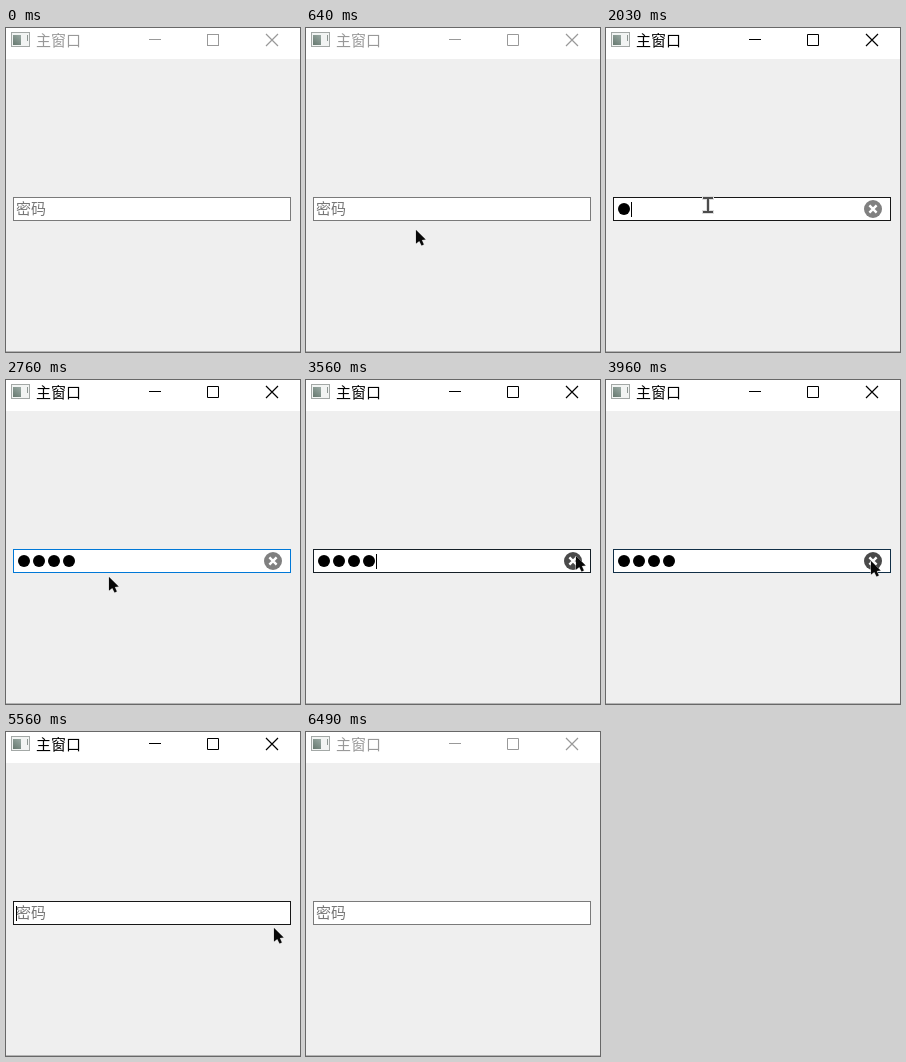
Animation, 294 px wide and 324 px high, one loop 6.63 s. Source, as an HTML page with a canvas:

```html
<!DOCTYPE html>
<html lang="zh">
<head>
<meta charset="utf-8">
<style>
html, body { margin: 0; width: 294px; height: 324px; overflow: hidden; background: #efefef; }
canvas { display: block; }
</style>
</head>
<body>
<canvas id="stage" width="294" height="324"></canvas>
<script>
const ctx = document.getElementById('stage').getContext('2d');
const LOOP = 6630, ACTIVATE = 840, DEACTIVATE = 6430;
const TYPE = 1965, KEY_GAP = 65, CLEAR = 4960;
const CLICK = 200, BLINK = 530, FADE = 180;
const ENTER = 120, LEAVE = 6030;
const GRAY = [122, 122, 122], DARK = [23, 23, 23], BLUE = [0, 120, 215];
const field = { x: 7, y: 169, w: 278, h: 24 };
const button = { x: 267, y: 181, r: 9 };

// The pointer rests between moves; bend bows the path vertically
const moves = [
  { from: ENTER, to: 770, x: 112, y: 187, bend: 0 },
  { from: 1569, to: 1570, x: 109, y: 158, bend: 0 },
  { from: 1570, to: 2030, x: 102, y: 177, bend: 0 },
  { from: 2030, to: 2760, x: 103, y: 196, bend: 0 },
  { from: 3090, to: 3560, x: 270, y: 175, bend: 20 },
  { from: 3560, to: 4030, x: 265, y: 183, bend: -12 },
  { from: 5490, to: 5560, x: 268, y: 195, bend: 0 },
  { from: 5560, to: LEAVE, x: 274, y: 324, bend: 0 }
];

const clamp = v => Math.max(0, Math.min(1, v));
const mix = (a, b, k) => a + (b - a) * k;
const smooth = k => k * k * (3 - 2 * k);
const within = (v, a, b) => v >= a && v < b;
const isActive = t => within(t, ACTIVATE, DEACTIVATE);

function pointerAt(t) {
  if (!within(t, ENTER, LEAVE)) return null;
  let x = 96, y = 320;
  for (const m of moves) {
    const k = smooth(clamp((t - m.from) / (m.to - m.from)));
    x = mix(x, m.x, k);
    y = mix(y, m.y, k) + m.bend * Math.sin(Math.PI * k);
  }
  return { x: Math.round(x), y: Math.round(y) };
}

function hovers(t) {
  const p = pointerAt(t);
  return p !== null && within(p.y, field.y, field.y + field.h + 3);
}

// Hover darkens gradually and ends at once
function borderAt(t) {
  const base = isActive(t) ? BLUE : GRAY;
  const samples = 12;
  let held = 0;
  while (held < samples && hovers(t - held * FADE / samples)) held++;
  return `rgb(${base.map((c, i) => Math.round(mix(c, DARK[i], held / samples)))})`;
}

function dotsAt(t) {
  if (!within(t, TYPE, CLEAR)) return 0;
  return Math.min(4, Math.max(1, Math.floor((t - TYPE) / KEY_GAP)));
}

function caretOn(t) {
  const reset = t < TYPE ? 1080 : 2170;
  return isActive(t) && Math.floor(Math.max(0, t - reset) / BLINK) % 2 === 0;
}

function rect(x, y, w, h, color) {
  ctx.fillStyle = color;
  ctx.fillRect(x, y, w, h);
}

function disc(x, y, r, color) {
  ctx.fillStyle = color;
  ctx.beginPath();
  ctx.arc(x, y, r, 0, Math.PI * 2);
  ctx.fill();
}

function cross(x, y, r, width, color) {
  ctx.strokeStyle = color;
  ctx.lineWidth = width;
  ctx.beginPath();
  ctx.moveTo(x - r, y - r);
  ctx.lineTo(x + r, y + r);
  ctx.moveTo(x + r, y - r);
  ctx.lineTo(x - r, y + r);
  ctx.stroke();
}

function label(text, x, y, color, weight) {
  ctx.font = weight + ' 15px "Noto Sans CJK SC", "Noto Sans CJK", sans-serif';
  ctx.fillStyle = color;
  ctx.fillText(text, x, y);
}

function drawWindowIcon() {
  const shade = ctx.createLinearGradient(7, 17, 15, 7);
  shade.addColorStop(0, '#66786f');
  shade.addColorStop(1, '#9aaaa4');
  rect(5, 4, 19, 15, '#a3a8a6');
  rect(6, 5, 17, 13, '#f2f4f3');
  rect(7, 7, 8, 10, shade);
  rect(21, 7, 1, 6, '#8d9692');
}

function drawWindow(active) {
  const ink = active ? '#000' : '#999';
  rect(0, 0, 294, 324, '#efefef');
  rect(0, 0, 294, 31, '#fff');
  rect(0, 323, 294, 1, '#b4b4b4');
  drawWindowIcon();
  label('主窗口', 30, 18, ink, 400);
  rect(143, 11, 12, 1, ink);
  ctx.strokeStyle = ink;
  ctx.lineWidth = 1;
  ctx.strokeRect(201.5, 6.5, 11, 11);
  cross(266, 12, 6, 1.2, ink);
}

function drawClearButton(t, pointer) {
  const shown = clamp((t - TYPE) / 60) * (1 - clamp((t - CLEAR) / 160));
  const hover = pointer && pointer.x >= button.x - button.r && hovers(t);
  ctx.globalAlpha = shown;
  disc(button.x, button.y, button.r, hover ? '#4a4a4a' : '#808080');
  cross(button.x, button.y, 3.6, 2.4, '#fff');
  ctx.globalAlpha = 1;
}

function drawField(t, pointer) {
  const { x, y, w, h } = field;
  const count = dotsAt(t);
  rect(x, y, w, h, borderAt(t));
  rect(x + 1, y + 1, w - 2, h - 2, '#fff');
  if (!count) label('密码', 10, 186, '#777', 300);
  for (let i = 0; i < count; i++) disc(18 + 15 * i, 181, 6, '#000');
  if (caretOn(t)) rect(10 + 15 * count, 174, 1, 15, '#000');
  drawClearButton(t, pointer);
}

function drawArrow(x, y) {
  const shape = [[0, 1], [0, 14.5], [3.3, 12], [5.6, 16.5], [7.8, 15.5], [5.8, 11], [9.6, 10.5]];
  ctx.beginPath();
  shape.forEach(([dx, dy]) => ctx.lineTo(x + dx, y + dy));
  ctx.closePath();
  ctx.lineJoin = 'round';
  ctx.lineWidth = 1;
  ctx.strokeStyle = '#ccc';
  ctx.stroke();
  ctx.fillStyle = '#080808';
  ctx.fill();
}

function drawBeam(x, y) {
  const part = (grow, color) => {
    for (const dy of [-8, 6]) rect(x - 5 - grow, y + dy - grow, 10 + 2 * grow, 2 + 2 * grow, color);
    rect(x - 1 - grow, y - 8, 2 + 2 * grow, 16, color);
  };
  part(1, '#ddd');
  part(0, '#4c4c4c');
}

function drawPointer(t, { x, y }) {
  const overText = x < button.x - button.r && within(y, field.y, field.y + field.h);
  (overText ? drawBeam : drawArrow)(x, y);
  const pressed = [ACTIVATE, CLEAR - CLICK].some(start => within(t, start, start + CLICK));
  if (pressed) {
    ctx.globalCompositeOperation = 'multiply';
    disc(x - 1, y - 2, 15, '#ffff66');
    ctx.globalCompositeOperation = 'source-over';
    disc(x - 1, y - 2, 15, 'rgba(255,255,0,.15)');
  }
}

function draw(t) {
  const pointer = pointerAt(t);
  drawWindow(isActive(t));
  drawField(t, pointer);
  if (pointer) drawPointer(t, pointer);
}

const start = performance.now();
function tick() {
  draw((performance.now() - start) % LOOP);
  requestAnimationFrame(tick);
}
tick();
</script>
</body>
</html>
```
